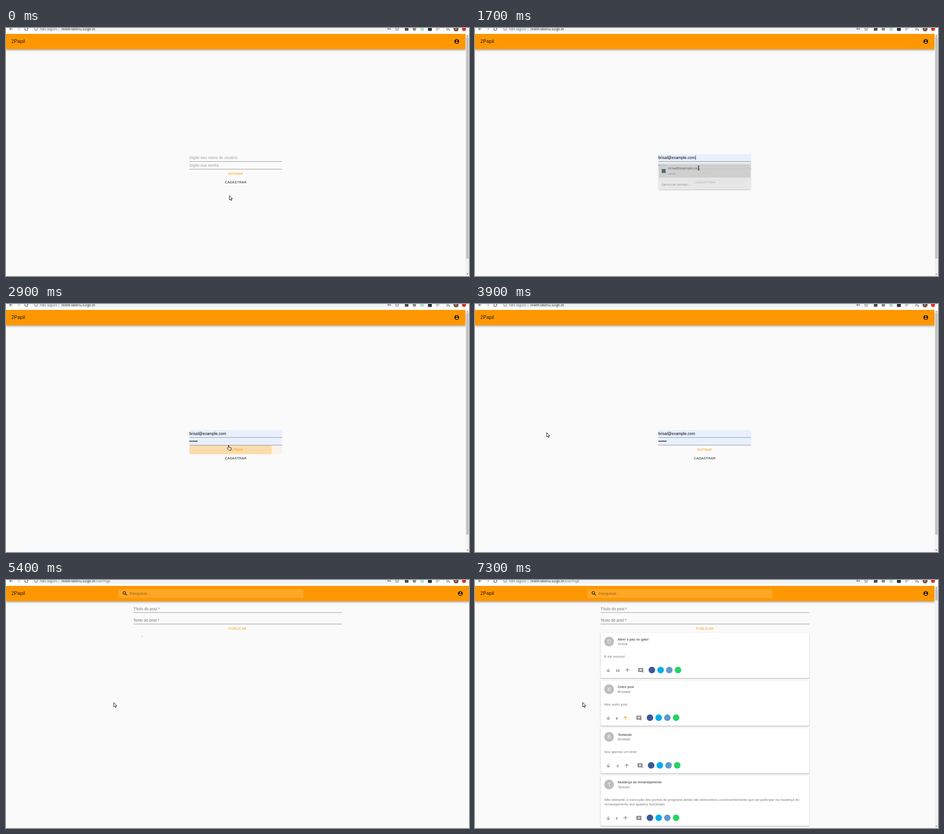
These frames come from a looping animation (1021 px wide and 549 px high, 8 s). An HTML page with a canvas:

```html
<!DOCTYPE html>
<html lang="pt-BR">
<head>
<meta charset="utf-8">
<title>2Papil</title>
<style>
  html, body { margin: 0; width: 100%; height: 100%; overflow: hidden; background: #fafafa; }
  canvas { display: block; }
</style>
</head>
<body>
<canvas id="stage" width="1021" height="549"></canvas>
<script>
const ctx = document.getElementById('stage').getContext('2d');
const LOOP = 8000;
const ZOOM = 8 / 15;                 // page zoom: 16px text is 8.53px
const SANS = '"Liberation Sans", Arial, sans-serif';
const UI = '"Open Sans", "Noto Sans", sans-serif';
const DARK = 'rgba(0,0,0,.87)', MUTED = 'rgba(0,0,0,.54)', HINT = 'rgba(0,0,0,.37)';
const LINE = 'rgba(0,0,0,.42)', ORANGE = '#ff9800', AUTOFILL = '#e8f0fe';
const EMAIL = 'brisal@example.com', DOTS = '••••••';

const ARROW = new Path2D('M4 12l1.41 1.41L11 7.83V20h2V7.83l5.58 5.59L20 12l-8-8-8 8z');
const COMMENT = new Path2D('M22 4c0-1.1-.9-2-2-2H4c-1.1 0-2 .9-2 2v12c0 1.1.9 2 2 2h14l4 4zM18 14H6v-2h12zm0-3H6V9h12zm0-3H6V6h12z');
const PERSON = new Path2D('M12 2a10 10 0 1 0 0 20a10 10 0 1 0 0-20zm0 3a3 3 0 1 1 0 6a3 3 0 1 1 0-6zm0 14.2c-2.5 0-4.71-1.28-6-3.22.03-2 4-3.08 6-3.08s5.97 1.09 6 3.08c-1.29 1.94-3.5 3.22-6 3.22z');
const POINTER = new Path2D('M0 0V9.6L2.2 7.6 3.8 11 5.4 10.3 3.9 7H6.6Z');
const HAND = new Path2D('M0 1q1-1.5 2 0V4.4L6.6 5.4 6.2 10.5H1.6L-2.2 6.6-1.4 5.6 0 6.6Z');

// time, x, y, shape; the pointer jumps from one place to the next
const CURSOR = [
  [0, 492.7, 371, 'arrow'], [400, 499, 330, 'arrow'], [500, 504, 271, 'arrow'],
  [800, 501, 287, 'beam'], [1100, 497, 295, 'arrow'], [1300, 493.6, 304, 'arrow'],
  [1700, 493, 310, 'beam'], [1800, 540, 325, 'arrow'], [1900, 600, 344, 'arrow'],
  [2000, 644, 348, 'arrow'], [2100, 637, 349, 'arrow'], [2200, 629.2, 349.7, 'arrow'],
  [2300, 585, 338, 'arrow'], [2400, 530, 324, 'hand'], [2500, 490, 313, 'hand'],
  [3600, 148.5, 290, 'arrow'], [3900, 158.2, 284.7, 'arrow'], [4300, 237.7, 271.3, 'arrow']
];
const SPINNER_TIMES = [4300, 4700, 5000, 5400, 5800, 6200, 6500, 6900];
const POSTS = [
  ['Atirei o pau no gato!', 'OraVa', ['E ele morreu!'], '10'],
  ['Outro post', 'Brisalab', ['Meu outro post'], '6', true],
  ['Testando', 'Brisalab', ['Sou apenas um teste'], '-2'],
  ['Mudança do remanejamento', 'Tavindo', [
    'Não obstante, a execução dos pontos do programa ainda não demonstrou convincentemente que vai participar na mudança do',
    'remanejamento dos quadros funcionais.'], '0']
];

function text(str, x, y, color, size = 16 * ZOOM, spacing = .009, align = 'left', font = SANS) {
  ctx.font = `${size}px ${font}`;
  ctx.letterSpacing = `${size * spacing}px`;
  ctx.textAlign = align;
  ctx.fillStyle = color;
  ctx.fillText(str, x, y);
}
const uiText = (str, x, y, color, size = 7.1) => text(str, x, y, color, size, 0, 'left', UI);
const button = (str, x, y, color) => text(str, x, y, color, 14 * ZOOM, .0286, 'center');
const small = (str, x, y, color) => text(str, x, y, color, 14 * ZOOM, .0107);

function rect(x, y, w, h, color, radius = 0) {
  ctx.fillStyle = color;
  ctx.beginPath();
  ctx.roundRect(x, y, w, h, radius);
  ctx.fill();
}
function circle(x, y, r, color) {
  ctx.fillStyle = color;
  ctx.beginPath();
  ctx.arc(x, y, r, 0, 7);
  ctx.fill();
}
function stroke(points, color, width = 1, close = false) {
  ctx.strokeStyle = color;
  ctx.lineWidth = width;
  ctx.beginPath();
  points.forEach(([x, y]) => ctx.lineTo(x, y));
  if (close) ctx.closePath();
  ctx.stroke();
}
function raised(x, y, w, h, color, radius, blur, offset, alpha) {
  ctx.save();
  ctx.shadowColor = `rgba(0,0,0,${alpha})`;
  ctx.shadowBlur = blur;
  ctx.shadowOffsetY = offset;
  rect(x, y, w, h, color, radius);
  ctx.restore();
}
function icon(path, x, y, color, turn = 0, scale = ZOOM) {
  ctx.save();
  ctx.translate(x, y);
  ctx.rotate(turn * 2 * Math.PI);
  ctx.scale(scale, scale);
  ctx.translate(-12, -12);
  ctx.fillStyle = color;
  ctx.fill(path, 'evenodd');
  ctx.restore();
}

function browserBar(path) {
  const grey = '#5f6368';
  rect(0, 0, 1021, 13, '#fff');
  rect(57, -12, 814, 20.5, '#f1f3f4', 10);
  icon(ARROW, 11, 2, '#4a4d51', -.25, .46);
  icon(ARROW, 28, 2, '#b9bbbe', .25, .46);
  ctx.strokeStyle = '#4a4d51';
  ctx.lineWidth = 1.1;
  ctx.beginPath();
  ctx.arc(45, 2, 3.4, .2, 5.4);
  ctx.stroke();
  rect(46, -1.5, 3, 3, '#4a4d51');
  ctx.strokeStyle = grey;
  ctx.lineWidth = .8;
  ctx.beginPath();
  ctx.arc(66.5, 2, 3.4, 0, 7);
  ctx.stroke();
  rect(66.1, 1.5, .9, 2.6, grey);
  uiText('Não seguro', 75, 4.8, grey);
  rect(116.5, -2, .7, 8, '#a5a8ab');
  uiText('reddit-labenu.surge.sh', 122, 4.8, '#202124');
  uiText(path, 197, 4.8, '#70757a');

  circle(843, 2, 1.8, grey);
  circle(843, 2, .7, '#f1f3f4');
  rect(844.5, 1.4, 4.5, 1.2, grey);
  rect(847, 2, 1.2, 2, grey);
  const star = Array.from({ length: 10 }, (_, i) => {
    const a = i * Math.PI / 5 - Math.PI / 2, r = i % 2 ? 1.8 : 4;
    return [862.3 + r * Math.cos(a), 2.3 + r * Math.sin(a)];
  });
  stroke(star, grey, .8, true);
  rect(879.5, -2, 8, 8, '#4b4d50', 1);
  circle(900.5, 2, 4, '#8c8c8c');
  circle(917.5, 2, 4.5, '#a6e6c9');
  rect(930.5, -2, 8.5, 8.5, '#21323c', 1);
  [0, 2.3, 4.6].forEach((y, i) => rect(948, y - .5, i === 2 ? 5 : 8, 1, '#85888b'));
  rect(964, -2, .8, 9, '#d0d2d4');
  [0, 2.5].forEach(y => rect(971, y - .5, 6, 1, grey));
  rect(971, 4.3, 3.5, 1, grey);
  circle(977.5, 4.4, 1.3, grey);
  circle(992.5, 2, 5.6, '#795548');
  text('F', 992.5, 4.3, '#eee', 6, 0, 'center');
  circle(1010, 2, 4.5, '#e5301e');
}

function appBar(width, search) {
  raised(0, 13, width, 34, ORANGE, 0, 5, 1.5, .42);
  text('2Papil', 12, 33.4, DARK, 20 * ZOOM, .0075);
  icon(PERSON, width - 19.5, 29.8, DARK);
  if (!search) return;
  rect(247.5, 20.5, 408.5, 19, 'rgba(255,255,255,.15)', 2);
  ctx.strokeStyle = DARK;
  ctx.lineWidth = 1.2;
  ctx.beginPath();
  ctx.arc(261, 28.5, 2.9, 0, 7);
  ctx.stroke();
  stroke([[263, 30.5], [266.5, 34]], DARK, 1.4);
  text('Pesquisar…', 272.8, 32.6, LINE);
}

function scrollBar(thumbHeight) {
  rect(1013.5, 13, 7.5, 536, '#f1f1f1');
  rect(1014.7, 20.5, 5.5, thumbHeight, '#c1c1c1');
  [[18.3, -2], [543.8, 2]].forEach(([y, h]) => {
    ctx.fillStyle = '#505050';
    ctx.beginPath();
    ctx.moveTo(1015.4, y);
    ctx.lineTo(1019.6, y);
    ctx.lineTo(1017.5, y + h);
    ctx.fill();
  });
}

function passwordMenu(t) {
  if (t < 1000 || t >= 1800) return;
  const closing = t >= 1700;
  ctx.save();
  ctx.globalAlpha = closing ? .68 : t < 1100 ? .5 : 1;
  if (closing) {
    ctx.translate(506.5, 327);
    ctx.scale(.985, .985);
    ctx.translate(-506.5, -327);
  }
  raised(404, 296.3, 205, 61.5, '#fff', 1, 3, 1, .4);
  if (t >= 1400) rect(404, 301.3, 205, 30, '#c4c4c4');
  rect(404, 336, 205, .8, '#d9d9d9');
  rect(410.3, 312, 8.8, 8.8, '#20343f', .8);
  uiText(EMAIL, 425, 313, '#202124', 7.3);
  uiText(DOTS, 425, 325.6, '#444', 7.2);
  uiText('Gerenciar senhas…', 410.3, 349.6, '#5f6368', 7.15);
  ctx.restore();
}

function loginPage(t) {
  const filled = t >= 1400, focused = t >= 900 && t < 2900;
  if (filled) {
    rect(404.3, 279, 204.5, 16.5, AUTOFILL);
    rect(404.3, 296.5, 204.5, 16, AUTOFILL);
    text(EMAIL, 404.3, 290.2, '#000');
    text(DOTS, 404.3, 307.2, '#000');
  } else {
    text('Digite seu nome de usuário.', 404.3, 290.2, HINT);
    text('Digite sua senha.', 404.3, 307.2, HINT);
  }
  rect(404.3, 295, 204.5, 1, LINE);
  rect(404.3, 312, 204.5, 1, LINE);
  if (focused && t < 1700) {
    const half = t < 1000 ? 55 : 102.2;
    rect(506.5 - half, 294.8, half * 2, 1.2, '#e19a3f');
  } else if (focused && t >= 1800) {
    rect(404.3, 295, 204.5, 1, '#d08b66');
  }
  if (focused && t < 2400) rect(filled ? 486.2 : 404.3, 282, .8, 10, '#111');

  if (t >= 2400 && t < 3600) {
    ctx.save();
    ctx.beginPath();
    ctx.roundRect(404.3, 313, 204.5, 19.5, 2);
    ctx.clip();
    rect(404, 313, 206, 20, 'rgba(255,152,0,.08)');
    if (t >= 2900) circle(491, 322, t < 3300 ? 95 : 120, `rgba(255,152,0,${t < 3300 ? .25 : .1})`);
    ctx.restore();
  }
  button('ENTRAR', 506.6, 325.4, ORANGE);
  button('CADASTRAR', 506.6, 344.4, DARK);
  passwordMenu(t);
}

function postForm(x) {
  [['Título do post', 66.7], ['Texto do post', 92.3]].forEach(([label, y]) => {
    text(label + '\u2009*', x, y, MUTED);
    rect(x, y + 4.8, 460, 1, LINE);
  });
  button('PUBLICAR', x + 229.8, 110.2, ORANGE);
}

function spinner(t) {
  const step = SPINNER_TIMES.filter(s => s <= t).length - 1;
  const phase = (.166 + .268 * step) % 1;
  const smooth = x => x * x * (3 - 2 * x);
  const grow = smooth(Math.min(1, phase * 2)), shrink = smooth(Math.max(0, phase * 2 - 1));
  const radius = 20.2, offset = 15 * grow + 110 * shrink;
  const length = Math.min(1 + 99 * grow, 2 * Math.PI * radius - offset);
  const start = offset / radius + phase * 2 * Math.PI;
  ctx.strokeStyle = ORANGE;
  ctx.lineWidth = 1.75;
  ctx.beginPath();
  ctx.arc(291.2, 127.3, 9.75, start, start + length / radius);
  ctx.stroke();
}

function post([title, author, body, votes, liked], top) {
  const extra = (body.length - 1) * 10.7, y = top + 83 + extra;
  raised(277, top, 460, 100.3 + extra, '#fff', 2, 2, .8, .45);
  circle(295.7, top + 19.2, 10.7, '#bdbdbd');
  text(author[0], 295.8, top + 23.1, '#fafafa', 20 * ZOOM, 0, 'center');
  small(title, 314.8, top + 16.8, DARK);
  small(author, 314.8, top + 27.4, MUTED);
  body.forEach((line, i) => small(line, 285, top + 55 + i * 10.7, MUTED));
  icon(ARROW, 293.8, y, MUTED, .5);
  small(votes, 310.5, y + 3, DARK);
  const x = 327.6 + ctx.measureText(votes).width;
  icon(ARROW, x, y, liked ? ORANGE : MUTED);
  icon(COMMENT, x + 29.5, y + .3, MUTED);
  ['#3b5998', '#00aced', '#5f99cf', '#25d366'].forEach((color, i) =>
    circle(x + 54 + i * 19.2, y - .7, 7.2, color));
}

function userPage(t) {
  const loaded = t >= 7300;
  postForm(loaded ? 277 : 280.7);
  if (loaded) POSTS.forEach((p, i) => post(p, 117 + i * 105.5));
  else spinner(t);
}

function cursor(t) {
  const [, x, y, shape] = CURSOR.filter(k => k[0] <= t).pop();
  if (shape === 'beam') {
    stroke([[x, y - 4.5], [x, y + 4.5]], '#222', 1.2);
    [-4.5, 4.5].forEach(d => stroke([[x - 2.2, y + d], [x + 2.2, y + d]], '#222', 1));
    return;
  }
  const path = shape === 'hand' ? HAND : POINTER;
  ctx.save();
  ctx.translate(x, y);
  ctx.fillStyle = '#fff';
  ctx.strokeStyle = '#111';
  ctx.lineWidth = 1;
  ctx.fill(path);
  ctx.stroke(path);
  ctx.restore();
}

function draw(now) {
  const t = Math.floor(now % LOOP / 100) * 100;
  const loggedIn = t >= 4300, scrolls = !loggedIn || t >= 7300;
  rect(0, 0, 1021, 549, '#fafafa');
  if (loggedIn) userPage(t);
  else loginPage(t);
  appBar(scrolls ? 1013.5 : 1021.5, loggedIn);
  browserBar(loggedIn ? '/userPage' : '');
  if (scrolls) scrollBar(loggedIn ? 24.5 : 490);
  cursor(t);
}

const begin = performance.now();
function tick() {
  draw(performance.now() - begin);
  requestAnimationFrame(tick);
}
tick();
</script>
</body>
</html>
```
